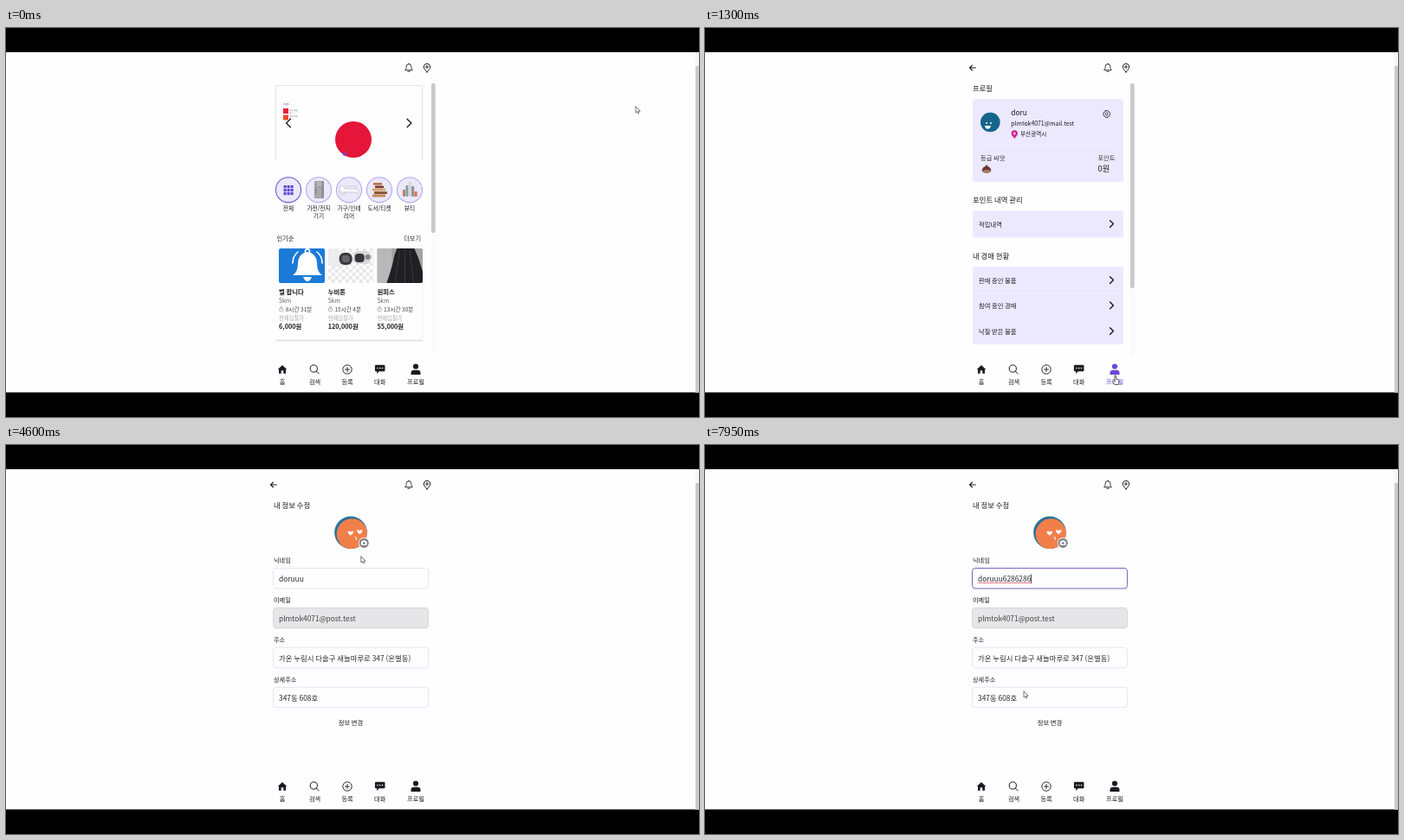
Recreate the animation shown at these times as an HTML page with a canvas. Size 800 by 450 pixels, loop 8 s.

```html
<!DOCTYPE html>
<html lang="ko">
<head>
<meta charset="utf-8">
<style>
html, body { margin: 0; width: 100%; height: 100%; overflow: hidden; background: #000; }
canvas { display: block; width: 100vw; height: 100vh; }
</style>
</head>
<body>
<canvas id="stage" width="800" height="450"></canvas>
<script>
const ctx = document.getElementById('stage').getContext('2d');
const LOOP = 8000;
const INK = '#1c1c20', PURPLE = '#6a48d8', LILAC = '#ece9fe', PAPER = '#fefdff';
const PROFILE_AT = 1150, EDIT_AT = 3900, FOCUS_AT = 5800, TYPE_AT = 6450, TYPE_STEP = 110;
const NICK = 'doruuu', TYPED = '6286286';

// Time, x, y of the pointer tip.
const POINTER = [
  [0, 727, 91], [50, 724, 93], [450, 628, 167], [850, 473, 402], [1700, 473, 402],
  [1800, 465, 343], [2100, 465, 343], [2150, 465, 98], [2550, 465, 98], [2600, 463, 158],
  [2900, 463, 158], [2950, 464, 145], [3300, 464, 145], [3350, 445, 112], [3730, 445, 112],
  [3790, 370, 127], [3899, 370, 127], [3900, 452, 105], [4150, 452, 105], [4600, 410, 129],
  [4950, 376, 143], [5500, 347, 162], [7280, 347, 162], [7950, 368, 285]
];

function rect(x, y, w, h, fill, r = 0, stroke, lw = 1) {
  ctx.beginPath();
  ctx.roundRect(x, y, w, h, r);
  paint(fill, stroke, lw);
}
function circle(x, y, r, fill, stroke, lw = 1) {
  ctx.beginPath();
  ctx.arc(x, y, r, 0, Math.PI * 2);
  paint(fill, stroke, lw);
}
function paint(fill, stroke, lw) {
  if (fill) { ctx.fillStyle = fill; ctx.fill(); }
  if (stroke) { ctx.strokeStyle = stroke; ctx.lineWidth = lw; ctx.stroke(); }
}
function shape(x, y, d, fill, stroke, lw = 1) {
  ctx.save();
  ctx.translate(x, y);
  const path = new Path2D(d);
  ctx.lineCap = ctx.lineJoin = 'round';
  if (fill) { ctx.fillStyle = fill; ctx.fill(path); }
  if (stroke) { ctx.strokeStyle = stroke; ctx.lineWidth = lw; ctx.stroke(path); }
  ctx.restore();
}
// y is the vertical middle of the line.
function text(str, x, y, size = 7.2, color = INK, align = 'left', weight = 400) {
  ctx.font = `${weight} ${size}px "Noto Sans CJK KR", "Noto Sans CJK", sans-serif`;
  ctx.textAlign = align;
  ctx.fillStyle = color;
  ctx.fillText(str, x, y + size * .37);
}
function clipped(x, y, w, h, draw) {
  ctx.save();
  ctx.beginPath();
  ctx.roundRect(x, y, w, h, 2);
  ctx.clip();
  draw();
  ctx.restore();
}

const pin = (x, y, fill, stroke) => {
  shape(x, y, 'M0 5C-2 2.5-3.7 1-3.7-1A3.7 3.7 0 0 1 3.7-1C3.7 1 2 2.5 0 5Z', fill, stroke);
  circle(x, y - 1, 1.2, fill ? '#fff' : null, stroke);
};
const chevron = (x, y, dir, size, lw) =>
  shape(x, y, `M${-dir * size / 2} ${-size}L${dir * size / 2} 0L${-dir * size / 2} ${size}`, null, INK, lw);

function frame(page, hover) {
  rect(0, 0, 800, 450, '#000');
  rect(0, 28, 800, 393.5, PAPER);
  rect(795.5, 28, 4.5, 393.5, '#f6f5f7');
  rect(796, 44, 4, 377.5, '#cbcacc');
  shape(465, 46, 'M-4 2.5C-2.6 1-3-.5-2.8-1.5A2.8 2.8 0 0 1 2.8-1.5C3-.5 2.6 1 4 2.5ZM-1.2 4.2H1.2M0-4.3V-4.8', null, INK, .9);
  pin(486, 46, null, INK);
  if (page !== 'home') shape(309, 46, 'M3.3 0H-3.3M-.6-2.8L-3.4 0L-.6 2.8', null, INK, 1.2);
  const thumb = { home: 173, profile: 237 }[page];
  if (thumb) {
    rect(491, 64, 5, 316, '#fbfafc');
    rect(491, 64, 4.7, thumb, '#c9c8cb', 2);
  }

  const me = hover ? PURPLE : INK;
  shape(319, 395, 'M0-5L5.3 0H4V4.7H1.3V1.3H-1.3V4.7H-4V0H-5.3Z', INK);
  circle(355.3, 394, 4.1, null, INK, 1);
  shape(358.3, 397, 'M0 0L3 3', null, INK);
  circle(394, 395, 5.2, null, INK, .9);
  shape(394, 395, 'M-2.5 0H2.5M0-2.5V2.5', null, INK, .9);
  shape(431.7, 394, 'M-4.5-4.3H4.5Q5.8-4.3 5.8-3V2Q5.8 3.2 4.5 3.2H-1L-3.5 6V3.2H-4.5Q-5.8 3.2-5.8 2V-3Q-5.8-4.3-4.5-4.3Z', INK);
  for (const dx of [-2.8, 0, 2.8]) circle(431.7 + dx, 393.5, .8, '#fff');
  circle(473, 391.5, 3.1, me);
  shape(473, 398, 'M-5.5 3V1Q-5.5-2.3-2-2.3H2Q5.5-2.3 5.5 1V3Z', me);
  [['홈', 319], ['검색', 356.5], ['등록', 394], ['대화', 431.7], ['프로필', 473]]
    .forEach(([label, x], i) => text(label, x, 409, 7.2, i === 4 ? me : INK, 'center'));
}

function car() {
  const silver = ctx.createLinearGradient(0, 83, 0, 127);
  silver.addColorStop(0, '#77747a');
  silver.addColorStop(.5, '#a5a2a8');
  silver.addColorStop(1, '#5d5b61');
  ctx.fillStyle = '#dcdbde';
  ctx.fillRect(324, 126, 146, 3);
  shape(0, 0, 'M319 119L320 106Q324 100 361 97Q380 83 404 82Q432 81 451 93L470 95Q474 103 473 117L465 122L330 126Z', silver);
  shape(0, 0, 'M365 97Q383 86 402 85L405 96ZM407 85Q428 84 442 93L438 95L409 96Z', '#34343a');
  shape(0, 0, 'M328 105Q390 99 469 101M358 120L427 117M406 85L407 118M374 99L376 119', null, '#6a686e', .6);
  shape(0, 0, 'M321 107L329 105M321 109L328 116L320 118', null, '#303036', 1.2);
  shape(0, 0, 'M466 98L471 99L472 103', null, '#8a3b42', 1.2);
  for (const x of [343, 442]) {
    circle(x, 117.5, 11, '#2b2b30');
    circle(x, 117.5, 7.8, '#bcbac0');
    for (let i = 0; i < 10; i++) {
      const a = i * Math.PI / 5;
      shape(x, 117.5, `M0 0L${7 * Math.cos(a)} ${7 * Math.sin(a)}`, null, '#77757b', .8);
    }
  }
}

function banner(t) {
  const p = Math.min(1, Math.max(0, (t - 50) / 350));
  const slide = 170 * p * p * (3 - 2 * p);
  clipped(310, 65, 172, 91, () => {
    ctx.save();
    ctx.translate(-slide, 0);
    shape(0, 0, 'M311.5 153V66.5H480.5V153', null, '#e4e2e8', 1);
    text('Logo', 320, 87.5, 3, '#4a50c8');
    ['#e5203c', '#ee4b2b'].forEach((color, i) => {
      rect(320, 93 + i * 7.5, 6, 6, color);
      text('로고 모음', 327, 95 + i * 7.5, 2.5, '#777');
      text('예시', 327, 98 + i * 7.5, 2.5, '#999');
    });
    circle(401, 129, 21, '#e5163a');
    ctx.translate(170, 0);
    rect(311, 131, 170, 25, '#f8f7fa');
    car();
    ctx.restore();
  });
  chevron(326, 110, -1, 4.8, 1.3);
  chevron(465.5, 110, 1, 4.8, 1.3);
  circle(p < .5 ? 391 : 400, 146, 2.1, PURPLE);
}

const categoryArt = [
  x => { for (let i = 0; i < 9; i++) rect(x - 5.5 + i % 3 * 4, 182 + (i / 3 | 0) * 4, 3.2, 3.2, PURPLE, .6); },
  x => {
    rect(x - 5, 177, 11, 20, '#8d8d91', 1);
    rect(x - 4.5, 177.5, 8, 6, '#b6b6b9');
    rect(x - 4.5, 184.5, 8, 12, '#a8a8ac');
    shape(x - 3, 180, 'M0 0V2M0 6V11', null, '#606064', .7);
  },
  x => {
    shape(x, 187, 'M-10-4H-5V-1H8L11 1V5H9V3H-7V6H-9V2H-11Z', '#f9f9f7', '#c5c3c4', .7);
    shape(x, 187, 'M-3-1L-1-4H8V-1M-5 3V6', null, '#c9c7c5', .8);
  },
  x => ['#b67a4e', '#7d3b2b', '#d6a36e', '#8b4d35', '#c38658'].forEach((c, i) =>
    rect(x - 8 + i % 2 * 2 + (i < 2 ? 1 : 0), 179 + i * 3.4, i < 2 ? 10 : 15, 2.8, c, .5)),
  x => ['#c97a68', '#76a6a8', '#d8d2cc', '#8c8c98', '#d96f48'].forEach((c, i) =>
    rect(x - 8 + i * 3.4, [187, 182, 178, 183, 189][i], 3, [8, 13, 17, 12, 6][i], c, 1))
];

const itemArt = [
  x => {
    rect(x, 255, 53, 40, '#1b7ad8');
    shape(x + 33, 274, 'M-17 12Q-11 8-11-2Q-11-13 0-15Q11-13 11-2Q11 8 17 12ZM-5 14H5Q3 19 0 19Q-3 19-5 14Z', '#fff');
    circle(x + 33, 258.5, 2.6, null, '#fff', 1.6);
    shape(x + 33, 274, 'M-11-15Q-17-10-17-2M11-15Q17-10 17-2', null, '#fff', 1.6);
  },
  x => {
    rect(x, 255, 53, 40, '#fff');
    ctx.fillStyle = '#e8e7ea';
    for (let i = 0; i < 14; i++) for (let j = i % 2; j < 10; j += 2) ctx.fillRect(x + i * 4, 255 + j * 4, 4, 4);
    shape(x, 255, 'M0 1Q15 0 24 5Q29 12 23 20Q14 24 0 19Z', '#ecebed');
    rect(x + 13, 260, 15, 14, '#38383d', 6);
    rect(x + 16, 263, 9, 8, '#65656b', 3);
    rect(x + 29, 258, 21, 15, '#d8d7da', 6);
    rect(x + 31, 261, 11, 10, '#36363b', 4);
    circle(x + 46, 265, 3, '#85858a');
  },
  x => {
    rect(x, 255, 53, 40, '#a4a3a4');
    rect(x, 255, 17, 40, '#b9b8b8');
    shape(x, 255, 'M23 0H43L48 12L53 28V40H11Q17 23 20 8Z', '#202024');
    shape(x, 255, 'M26 3L21 39M32 2V39M38 3L42 39', null, '#39393e', 1);
  }
];

function home(t) {
  banner(t);
  [['전체'], ['가전/전자', '기기'], ['가구/인테', '리어'], ['도서/티켓'], ['뷰티']].forEach((lines, i) => {
    const x = 326 + i * 35;
    clipped(310, 170, 171, 35, () => {
      circle(x, 187.3, 14.6, '#eae8fb', i ? '#b7a9ee' : '#7459cf', 1.1);
      categoryArt[i](x);
    });
    lines.forEach((line, row) => text(line, x, 209 + row * 8.3, 6.7, INK, 'center'));
  });
  text('인기순', 312.5, 243.3);
  text('더보기', 479, 243.3, 7.2, '#333', 'right');
  rect(311, 360.5, 170, 2, '#e5e3e8', 1);
  rect(480.5, 250, .8, 111, '#eeecf0');
  [['벨 팝니다', '8시간 31분', '6,000원'], ['누비톤', '15시간 4분', '120,000원'], ['원피스', '13시간 30분', '55,000원']]
    .forEach(([name, left, price], i) => {
      const x = 315 + i * 56.7;
      clipped(x, 255, Math.min(53, 481 - x), 40, () => itemArt[i](x));
      text(name, x, 305, 7.4, INK, 'left', 700);
      text('5km', x, 315.3, 7, '#666');
      circle(x + 2.8, 325.8, 2.3, null, '#888', .6);
      shape(x + 2.8, 325.8, 'M0 0V-1.4M-.8-3.4H.8', null, '#888', .6);
      text(left, x + 7.7, 325.5, 6.6, '#444');
      text('현재입찰가', x, 335.4, 6.3, '#aaa');
      text(price, x, 345.5, 7.3, INK, 'left', 700);
    });
}

function profile() {
  text('프로필', 309, 70.3, 8.3);
  rect(309, 82.5, 174, 95.5, LILAC, 3);
  circle(329.3, 109, 11.3, '#14658b');
  circle(325, 110, 1, '#fff');
  circle(330, 110, 1, '#fff');
  shape(326.5, 113, 'M-3.5 0H3.5Q3 3.7 0 3.7Q-3 3.7-3.5 0Z', '#fff');
  text('doru', 353.3, 97.5, 8.4);
  text('plmtok4071@mail.test', 353.3, 110, 6.9);
  pin(357.3, 123, '#d1279d');
  text('부산광역시', 364, 123, 6.6);
  circle(463.7, 99.5, 1.4, null, INK, .8);
  shape(463.7, 99.5, 'M-1.2-4H1.2L1.7-2.7L3.2-2.3L3.9 0L3.2 2.3L1.7 2.7L1.2 4H-1.2L-1.7 2.7L-3.2 2.3L-3.9 0L-3.2-2.3L-1.7-2.7Z', null, INK, .8);
  rect(318, 135.5, 156, 1, '#f7f5ff');
  text('등급 씨앗', 318, 150, 7.3, '#333');
  shape(325, 163, 'M0-5Q1-3 4-1.5Q6 1 5 3Q0 6-5 3Q-6 1-4-1.5Q-1-3 0-5Z', '#6b3830');
  shape(325, 163, 'M-5 2Q0 0 5 2Q4 5 0 5Q-4 5-5 2Z', '#a87868');
  text('포인트', 453.5, 150, 7.2, '#333');
  text('0원', 453.5, 163, 9.3);
  text('포인트 내역 관리', 309, 199, 8.4);
  rect(309, 211.5, 174, 31, LILAC, 3);
  text('내 경매 현황', 309, 264, 8.4);
  rect(309, 276, 174, 90, LILAC, 3);
  [['적립내역', 227], ['판매 중인 물품', 292], ['참여 중인 경매', 321.3], ['낙찰 받은 물품', 351]].forEach(([label, y], i) => {
    text(label, 316, y, 7.3);
    chevron(469.5, y - .4, 1, 3.9, 1.4);
    if (i > 1) rect(316, y - 15, 160, .7, '#f3f0ff');
  });
}

function edit(t) {
  const focused = t >= FOCUS_AT;
  const count = Math.max(0, Math.min(TYPED.length, Math.floor((t - TYPE_AT) / TYPE_STEP) + 1));
  const nick = NICK + TYPED.slice(0, count);

  text('내 정보 수정', 309, 70.3, 8.4);
  ctx.save();
  ctx.beginPath();
  ctx.arc(398, 101.3, 18.8, 0, 7);
  ctx.clip();
  rect(378, 82, 40, 40, '#2b7299');
  circle(399.5, 103, 17.8, '#f17f4a');
  ctx.restore();
  const heart = 'M0 2.8L-3 0Q-3.5-2.5-1.5-2.4L0-1.2L1.5-2.4Q3.5-2.5 3 0Z';
  shape(397.8, 102, heart, '#fff');
  shape(408.3, 100.5, heart, '#fff');
  shape(404, 107.5, 'M-1-1Q2-1 0 1Q2 1 0 2', null, '#fff', .9);
  circle(413.2, 113.3, 6.3, '#fff');
  circle(413.2, 113.3, 5.6, '#85858a');
  rect(409.9, 111.3, 6.6, 4.8, '#fff', 1);
  rect(411.7, 110.4, 3, 1.6, '#fff');
  circle(413.2, 113.6, 1.3, '#77777c');

  [['닉네임', nick], ['이메일', 'plmtok4071@post.test'], ['주소', '가온 누림시 다솔구 새늘마루로 347 (온별동)'], ['상세주소', '347동 608호']]
    .forEach(([label, value], i) => {
      const y = 142.5 + i * 45.9;
      text(label, 309, y - 8.7, 7.2);
      const border = i === 0 && focused ? '#8064b8' : i === 1 ? '#d6d5d8' : '#e8e5ef';
      rect(308.5, y, 179, 23.5, i === 1 ? '#e6e5e7' : PAPER, 3.5, border, 1);
      text(value, 315, y + 12.3, 8.4, i === 1 ? '#444' : '#2a2a2e');
      if (i === 0 && focused) {
        const width = ctx.measureText(value).width;
        const caretOn = t < 6200 || t >= TYPE_AT;
        if (caretOn) rect(315 + width, 149.5, .8, 10.5, INK);
        if (count) {
          let wave = 'M0 0';
          for (let x = 1; x < width; x++) wave += `L${x} ${x % 2 ? 1 : 0}`;
          shape(315, 159, wave, null, '#e04050', .7);
        }
      }
    });
  text('정보 변경', 398, 321.3, 7.3, INK, 'center');
}

function pointer(t) {
  let i = POINTER.findIndex(k => k[0] > t);
  if (i < 0) i = POINTER.length;
  const a = POINTER[i - 1], b = POINTER[i] || a;
  const p = a === b ? 0 : (t - a[0]) / (b[0] - a[0]);
  const x = a[1] + (b[1] - a[1]) * p, y = a[2] + (b[2] - a[2]) * p;
  const hand = t >= 840 && t < 1720 || t >= 2150 && t < 2570;
  const beam = t >= 3770 && t < EDIT_AT || t >= EDIT_AT && y > 142 && y < 166;
  if (hand) shape(x, y, 'M0 0Q1-.8 1.5 0V4L4.5 5Q5.3 6 4.5 8.5L3.8 10.5H-.2L-3 6.5Q-2.5 5-1 6L0 7Z', '#fff', '#33333a', .8);
  else if (beam) shape(x, y, 'M-1.5-3.5H1.5M0-3.5V3.5M-1.5 3.5H1.5', null, '#333', .8);
  else shape(x, y, 'M0 0V7L1.6 5.6L2.8 8L3.8 7.5L2.8 5.2H4.8Z', '#fff', '#55555c', .8);
}

function draw(now) {
  const t = now % LOOP;
  const page = t < PROFILE_AT ? 'home' : t < EDIT_AT ? 'profile' : 'edit';
  frame(page, t >= 840 && t < 1750);
  ({ home, profile, edit })[page](t);
  pointer(t);
}

const start = performance.now();
function tick() {
  draw(performance.now() - start);
  requestAnimationFrame(tick);
}
tick();
</script>
</body>
</html>
```
